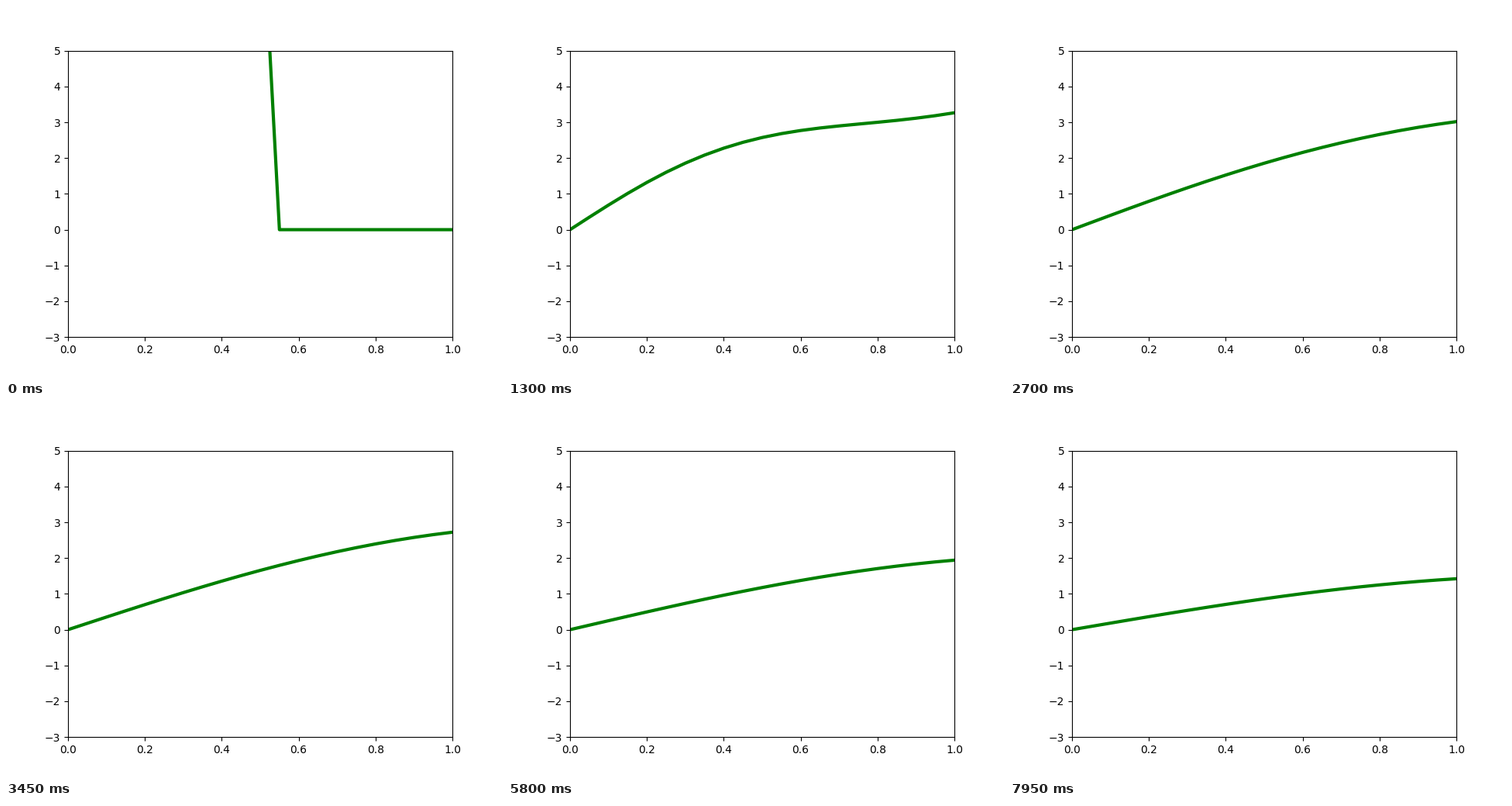
A matplotlib script that plays this animation: 640x480 px, repeating every 8 s.

```python
import numpy as np
import matplotlib.pyplot as plt
from matplotlib.animation import FuncAnimation

# Heat equation u_t = u_xx with u(0) = 0 and u_x(1) = H * u(1),
# advanced by the Crank-Nicolson method.
CELLS = 20
FRAMES = 160
DT = 0.005
H = 0.5

dx = 1 / CELLS
half_r = DT / dx**2 / 2
x = np.linspace(0, 1, CELLS + 1)


def build_matrices():
    n = CELLS + 1
    implicit, explicit = np.zeros((n, n)), np.zeros((n, n))
    for i in range(1, CELLS):
        implicit[i, i - 1:i + 2] = -half_r, 1 + 2 * half_r, -half_r
        explicit[i, i - 1:i + 2] = half_r, 1 - 2 * half_r, half_r
    implicit[0, 0] = 1
    implicit[-1, -2:] = -1, 1 - H * dx
    return implicit, explicit


def solve():
    implicit, explicit = build_matrices()
    step = np.linalg.solve(implicit, explicit)
    states = [np.where(np.arange(CELLS + 1) <= CELLS // 2, 10.0, 0.0)]
    for _ in range(FRAMES - 1):
        states.append(step @ states[-1])
    return states


states = solve()

fig, ax = plt.subplots(figsize=(6.4, 4.8), dpi=100)
ax.set_xlim(0, 1)
ax.set_ylim(-3, 5)
line, = ax.plot(x, states[0], color="green", lw=3)


def update(frame):
    line.set_ydata(states[frame])
    return line,


anim = FuncAnimation(fig, update, frames=FRAMES, interval=50, repeat=True)
plt.show()
```
